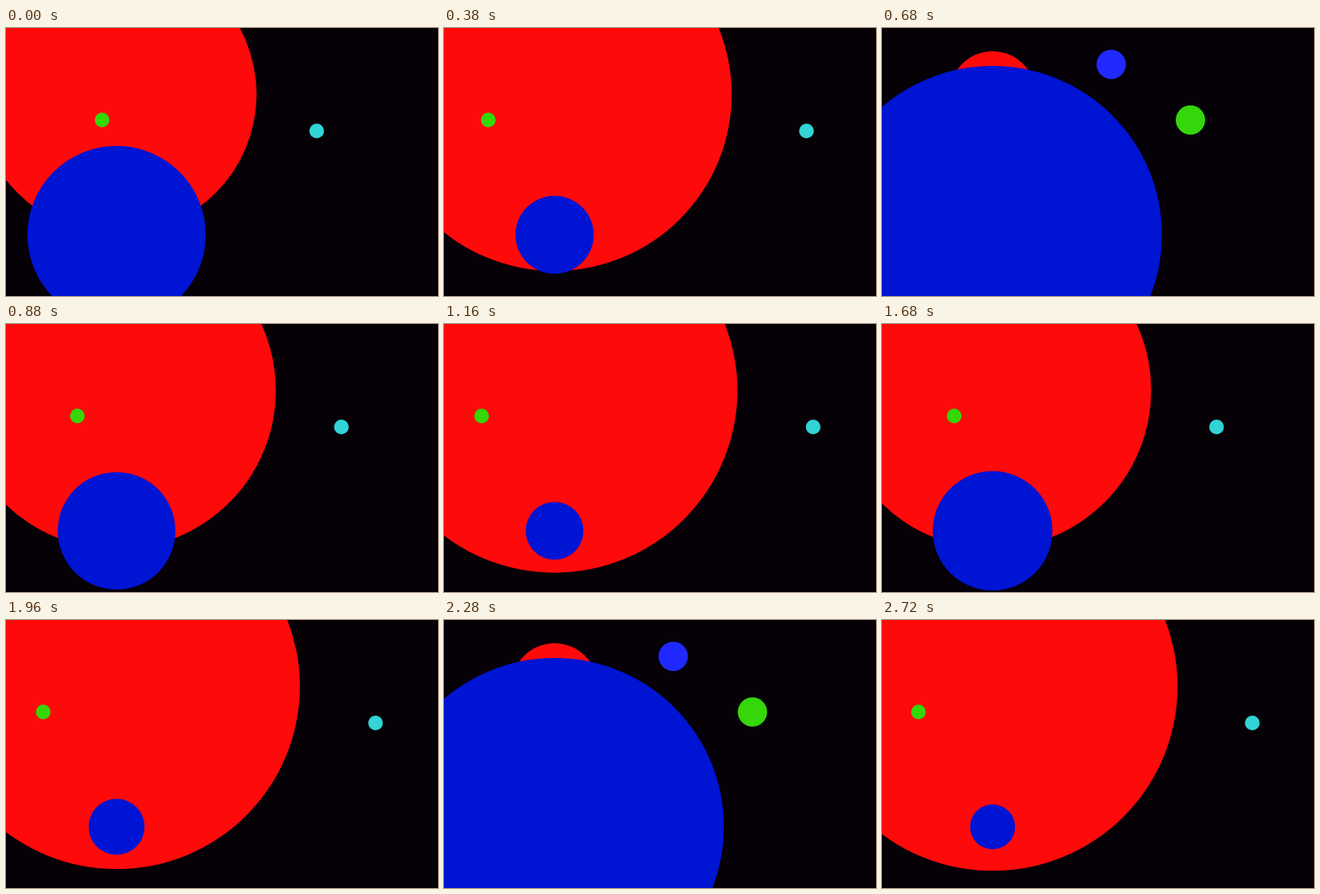
Recreate the animation shown at these times as an HTML page. Size 500 px wide and 311 px high, loop 2740 ms.

```html
<!DOCTYPE html>
<html lang="en">
<head>
<meta charset="utf-8">
<title>Pulsing circles</title>
<style>
  html, body { margin: 0; width: 100%; height: 100%; overflow: hidden; background: #060007; }
  svg { display: block; width: 100vw; height: 100vh; }
</style>
</head>
<body>
<svg viewBox="0 0 500 311" preserveAspectRatio="none">
  <circle id="violet" cx="265.3" cy="42.3" r="17" fill="#2029ff"/>
  <circle id="red" cx="128" cy="77" r="162" fill="#ff0a0b"/>
  <circle id="cyan" cx="360" cy="119.5" r="8.5" fill="#32d4d6"/>
  <circle id="green" cx="111" cy="106.7" r="8.5" fill="#35d60a"/>
  <circle id="blue" cx="128" cy="240" r="103" fill="#0014d3"/>
</svg>
<script>
const LOOP = 2740, CYCLE = 803, STEP = 20, SWELL = 450, MIRROR = 470.8;
const [violet, red, cyan, green, blue] = document.querySelectorAll("circle");

const easeOut = p => 1 - (1 - p) ** 2;
const easeInOut = p => p < 0.5 ? 4 * p ** 3 : 1 - 4 * (1 - p) ** 3;

// Each track pulls back, swings past its goal, then settles and rests.
const tracks = {
  greenX: [[0, 111.2], [329, 42], [610, 429], [660, 357]],
  redR: [[0, 162], [315, 214.1], [610, 0], [660, 50]],
  blueR: [[0, 103.2], [295, 25.9], [610, 273], [660, 196]]
};

function valueAt(keys, t) {
  const next = keys.findIndex(([time]) => time > t);
  if (next < 0) return keys[keys.length - 1][1];
  const [t0, v0] = keys[next - 1], [t1, v1] = keys[next];
  const ease = next === 1 ? easeOut : easeInOut;
  return v0 + (v1 - v0) * ease((t - t0) / (t1 - t0));
}

function set(circle, attribute, value) {
  circle.setAttribute(attribute, value.toFixed(2));
}

function draw(now) {
  const stepped = Math.floor((now % LOOP) / STEP) * STEP;
  const t = stepped % CYCLE;
  const x = valueAt(tracks.greenX, t);
  const dotRadius = t < SWELL ? 8.5 : 17;
  set(green, "cx", x);
  set(cyan, "cx", MIRROR - x);
  for (const dot of [green, cyan, violet]) set(dot, "r", dotRadius);
  set(red, "r", valueAt(tracks.redR, t));
  set(blue, "r", valueAt(tracks.blueR, t));
}

const start = performance.now();
function tick() {
  draw(performance.now() - start);
  requestAnimationFrame(tick);
}
tick();
</script>
</body>
</html>
```
